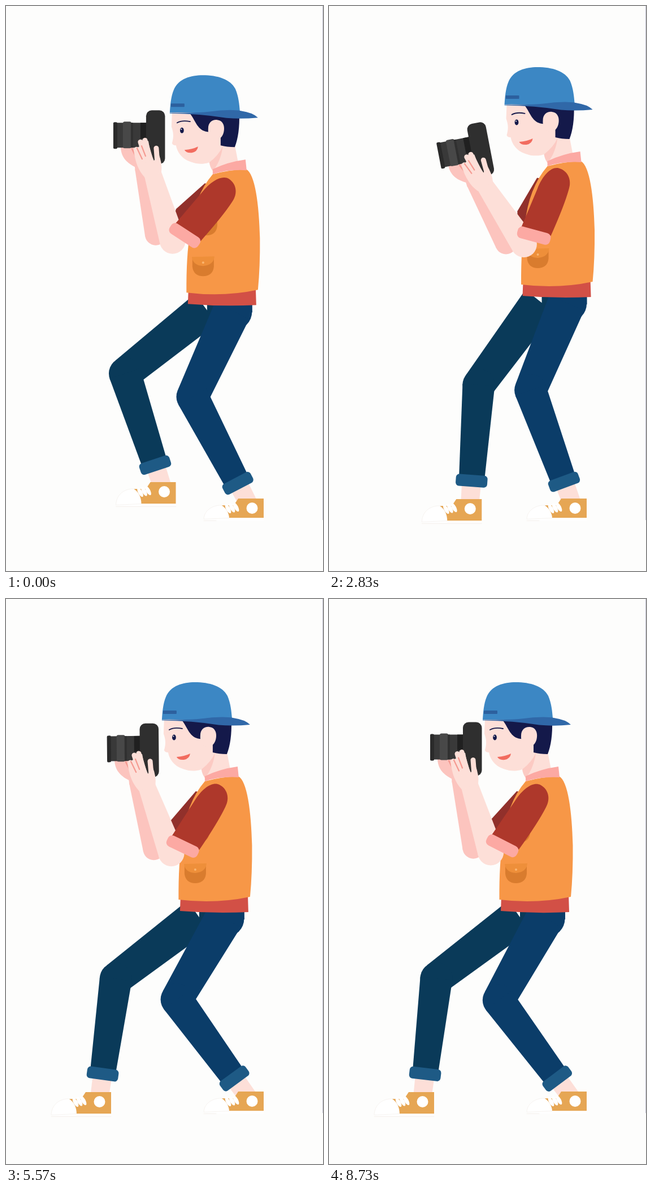
These frames come from a looping animation (561x998 px, 8.76 s). An HTML page with a canvas:

```html
<!DOCTYPE html>
<html lang="en">
<head>
<meta charset="utf-8">
<title>Photographer</title>
<style>
html, body { margin: 0; width: 100%; height: 100%; overflow: hidden; background: #fdfdfc; }
canvas { display: block; }
</style>
</head>
<body>
<canvas id="stage" width="561" height="998"></canvas>
<script>
const ctx = document.getElementById('stage').getContext('2d');
const LOOP = 8760, CYCLE = 4100;
const SKIN = '#fddfd8', SKIN_FAR = '#fcc4be', PINK = '#fca9a3', ORANGE = '#f79747',
  SLEEVE = '#ae382b', SLEEVE_FAR = '#91302b', JEANS = '#0b3d69', JEANS_FAR = '#0a3a59',
  TURNUP = '#1e5a85', NAVY = '#14194a';

// time, body x, body y, foot x, foot lift, arm angle, camera x, camera y, camera tilt
const poses = [
  [-250, 36, -42, 352, 0, 42, 246, 193, 0],
  [-130, 27, -36.5, 352, 0, 43, 248.5, 191.5, 0],
  [0, 0, 0, 301, 30, 44, 264, 184, 0],
  [130, -15.5, 21.5, 228, 22, 40.8, 270.5, 187.5, 0],
  [300, -18, 25, 186, 0, 38, 271, 192.5, 0],
  [1200, -18, 25, 186, 0, 38, 271, 192.5, 0],
  [1370, -16, 25, 186, 0, 37.5, 269, 193, 0],
  [2350, 7, 22, 186, 0, 16, 234, 238, -18],
  [2600, 8, 21, 190, 0, 15.7, 234, 238, -18],
  [2830, 20.5, -14, 270, 0, 26.3, 238, 221, -11],
  [3150, 36, -42, 352, 0, 42, 246, 193, 0],
  [3850, 36, -42, 352, 0, 42, 246, 193, 0]
];

// Smooth interpolation that never overshoots a key
function valueAt(t, c) {
  const rate = i => poses[i + 1] && poses[i]
    ? (poses[i + 1][c] - poses[i][c]) / (poses[i + 1][0] - poses[i][0]) : 0;
  const slope = i => {
    const a = rate(i - 1), b = rate(i);
    return a * b > 0 ? 2 * a * b / (a + b) : 0;
  };
  let i = 0;
  while (i < poses.length - 2 && t >= poses[i + 1][0]) i++;
  const p = poses[i], q = poses[i + 1], h = q[0] - p[0], u = (t - p[0]) / h, v = 1 - u;
  return p[c] * v * v * (1 + 2 * u) + q[c] * u * u * (3 - 2 * u)
    + h * u * v * (v * slope(i) - u * slope(i + 1));
}

function fill(color, path) {
  ctx.fillStyle = color;
  ctx.fill(new Path2D(path));
}

function line(color, width, path) {
  ctx.strokeStyle = color;
  ctx.lineWidth = width;
  ctx.lineCap = 'round';
  ctx.stroke(new Path2D(path));
}

function oval(color, x, y, rx, ry = rx, turn = 0) {
  ctx.fillStyle = color;
  ctx.beginPath();
  ctx.ellipse(x, y, rx, ry, turn, 0, 7);
  ctx.fill();
}

function box(color, x, y, w, h, r = 0) {
  ctx.fillStyle = color;
  ctx.beginPath();
  ctx.roundRect(x, y, w, h, r);
  ctx.fill();
}

function within(x, y, turn, draw) {
  ctx.save();
  ctx.translate(x, y);
  ctx.rotate(turn);
  draw();
  ctx.restore();
}

// Tapered bar; l and r are its half widths at the start, w at the end
function limb(color, a, b, l, r, w) {
  const len = Math.hypot(b[0] - a[0], b[1] - a[1]);
  const nx = (a[1] - b[1]) / len, ny = (b[0] - a[0]) / len;
  const at = (p, d) => `${p[0] + nx * d} ${p[1] + ny * d}`;
  fill(color, `M${at(a, l)}L${at(b, w)}L${at(b, -w)}L${at(a, -r)}Z`);
}

function turned([x, y], angle, px, py) {
  const c = Math.cos(angle), s = Math.sin(angle);
  return [px + x * c - y * s, py + x * s + y * c];
}

function leg(color, hip, ankle, thigh, shin, l, r) {
  const dx = ankle[0] - hip[0], dy = ankle[1] - hip[1], d = Math.hypot(dx, dy);
  const bend = Math.acos(Math.min(1, (thigh * thigh + d * d - shin * shin) / (2 * thigh * d)));
  const knee = turned([thigh, 0], Math.atan2(dy, dx) + bend, hip[0] - 1.5, hip[1]);
  const kx = ankle[0] - knee[0], ky = ankle[1] - knee[1], len = Math.hypot(kx, ky);
  const hem = [ankle[0] - kx / len * 48, ankle[1] - ky / len * 48];
  limb(SKIN, hem, ankle, 17, 17, 16);
  limb(color, hip, knee, l, r, 28.5);
  oval(color, ...knee, 28.5);
  limb(color, knee, hem, 28.5, 28.5, 22.5);
  within(...hem, Math.atan2(-kx, ky), () => box(TURNUP, -28, -10.5, 56, 21, 6));
}

function shoe(x, y, h) {
  within(x, y, 0, () => {
    const toe = `M-106 ${h + 2}C-105 18 -86 11 -74 12C-63 18 -61 28 -61 ${h}Z`;
    fill('#fff', `M-106 ${h}H0V${h + 5}H-106Z`);
    line('#f3eeea', 1, `M-106 ${h + 5}H${h > 35 ? 0 : -84}`);
    fill('#fff', toe);
    line('#f3eeea', 0.7, toe);
    fill('#e6a654', `M-45 0H0V${h}H-61C-61 28 -65 18 -74 12L-53 12Z`);
    for (const i of [0, 1, 2]) oval('#fff', -63 + i * 7, 18 - i * 1.5, 3.6, 9, -0.5);
    oval('#fff', -20.5, 17, 10);
  });
}

function pocket(x, y) {
  within(x, y, 0, () => {
    fill('#d97c2e', 'M330 446H368V460C367 472 359 477 349 477C338 477 331 471 330 460Z');
    fill('#ee8f3a', 'M329 443L369 442Q368 457 349 459Q331 458 329 443Z');
    oval('#fbb56f', 349, 453, 2);
  });
}

function torso() {
  fill('#d25046', 'M323 500L322 526Q383 531 443 528L442 496Z');
  fill(ORANGE, 'M366 297Q395 289 425 288C441 296 448 350 449.5 410Q450 460 446 501Q385 514 319.5 506Q319 440 326 400Q333 335 366 297Z');
  pocket(6, -72);
  pocket(0, 0);
}

function head() {
  fill(SKIN, 'M294 187L293 213C297 224 297 232 294 242Q295 246 301 246C303 257 311 270 327 275C342 281 356 278 363 275Q363 284 366 291Q388 288 411 276L404 240L390 190Z');
  fill('#fccac3', 'M384 247Q377 263 360 276Q361 284 366 291Q380 275 384 247Z');
  fill(PINK, 'M366 297V288Q393 275 424 271L426 290Q394 288 366 297Z');
  fill(NAVY, 'M326 190C336 203 339 220 357 222L380 225L380 246Q391 249 405 249Q414 226 413 190Z');
  fill(SKIN, 'M358 216C358 206 365 200 374 201C384 202 387 211 386 219C385 230 378 237 369 236C362 236 357 226 358 216Z');
  line(NAVY, 1.8, 'M303 206Q312 201 326 204');
  oval(NAVY, 311.5, 219.5, 3.4, 5);
  oval('#fff', 310.5, 217.5, 1);
  fill('#f26c5f', 'M316 254Q330 253 340 248Q339 257 329 259Q319 260 316 254Z');
  fill('#3c87c4', 'M290 188C291 174 292 160 297 148C305 128 328 122 348 122C375 122 397 129 406 146C412 160 413 174 414 185L400 194Q340 187 290 188Z');
  fill('#3068a8', 'M290 188.5Q345 189 372 185Q400 182 416 185Q437 188 446 197Q416 200 390 197.5Q345 190 290 189.5Z');
  box('#2c609e', 292, 172, 24, 6, 1);
}

function camera() {
  fill(SKIN_FAR, 'M203 249C204 265 211 275 228 284L229 292L260 285L250 249Z');
  line('#f59a91', 2.5, 'M223 252L231 268');
  box('#393939', 194, 206, 56, 44);
  box('#2a2a2a', 190, 205, 7, 47, 2);
  box('#484848', 207, 204, 15, 47, 3);
  box('#303030', 221, 206, 4, 44);
  box('#202020', 238, 206, 12, 28);
  box('#2f2f2f', 248, 184, 33.5, 95, 10);
}

function hand() {
  fill(SKIN, 'M226 254C229 276 234 290 246 303L275 293Q277 278 270 260L262 273Q255 258 252 238Z');
  line(SKIN, 9, 'M255 268L246 237M248 272L238 240M242 275L231 253M268 277L266 251');
  line('#f59a91', 2.2, 'M240 247L247 265M232 251L241 270');
}

function draw(t) {
  const phase = (t + 250) % CYCLE - 250;
  const [dx, dy, footX, lift, armDeg, camX, camY, tiltDeg] =
    poses[0].slice(1).map((_, i) => valueAt(phase, i + 1));
  const rad = Math.PI / 180, arm = (armDeg - 11) * rad, tilt = tiltDeg * rad;
  const elbow = turned([-22, 115], arm, 376, 330);
  const farElbow = turned([-53, 122], arm, 376, 330);
  const onCamera = part => within(camX, camY, tilt, () => {
    ctx.translate(-264, -184);
    part();
  });

  ctx.fillStyle = '#fdfdfc';
  ctx.fillRect(0, 0, 561, 998);
  ctx.fillStyle = '#c3c3d2';
  ctx.fillRect(560, 0, 1, 908);

  within(dx, dy, 0, () => {
    limb(SKIN_FAR, turned([-21, 101], tilt, camX, camY), farElbow, 15, 15, 19);
    oval(SKIN_FAR, ...farElbow, 19);
    within(366, 330, arm, () => fill(SLEEVE_FAR, 'M-21 -7L-39 59L-30 90L20 90L10 -10Z'));
  });

  box(JEANS_FAR, 356 + dx, 505 + dy, 48, 42);
  leg(JEANS_FAR, [358 + dx, 540 + dy], [footX - 21.5, 886.5 - lift], 182, 218, 39.5, 26);
  shoe(footX, 871 - lift, 38);
  box(JEANS, 370 + dx, 515 + dy, 66, 26);
  oval(JEANS, 404 + dx, 540 + dy, 31.5);
  leg(JEANS, [404 + dx, 540 + dy], [432.5, 885.6], 166.5, 220, 38, 29.5);
  shoe(456, 870, 34);

  within(dx, dy, 0, () => {
    torso();
    head();
    onCamera(camera);
    limb(SKIN, turned([-6, 106], tilt, camX, camY), elbow, 15, 15, 23);
    oval(SKIN, ...elbow, 23);
    onCamera(hand);
    within(376, 330, arm, () => {
      fill(SLEEVE, 'M-34.5 88L-25 15C-22 -15 -10 -31 2 -31C18 -31 30 -18 29 0Q29 30 20 88Z');
      box(PINK, -39, 85, 60, 21, 8);
    });
  });
}

function tick() {
  draw(performance.now() % LOOP);
  requestAnimationFrame(tick);
}
tick();
</script>
</body>
</html>
```
